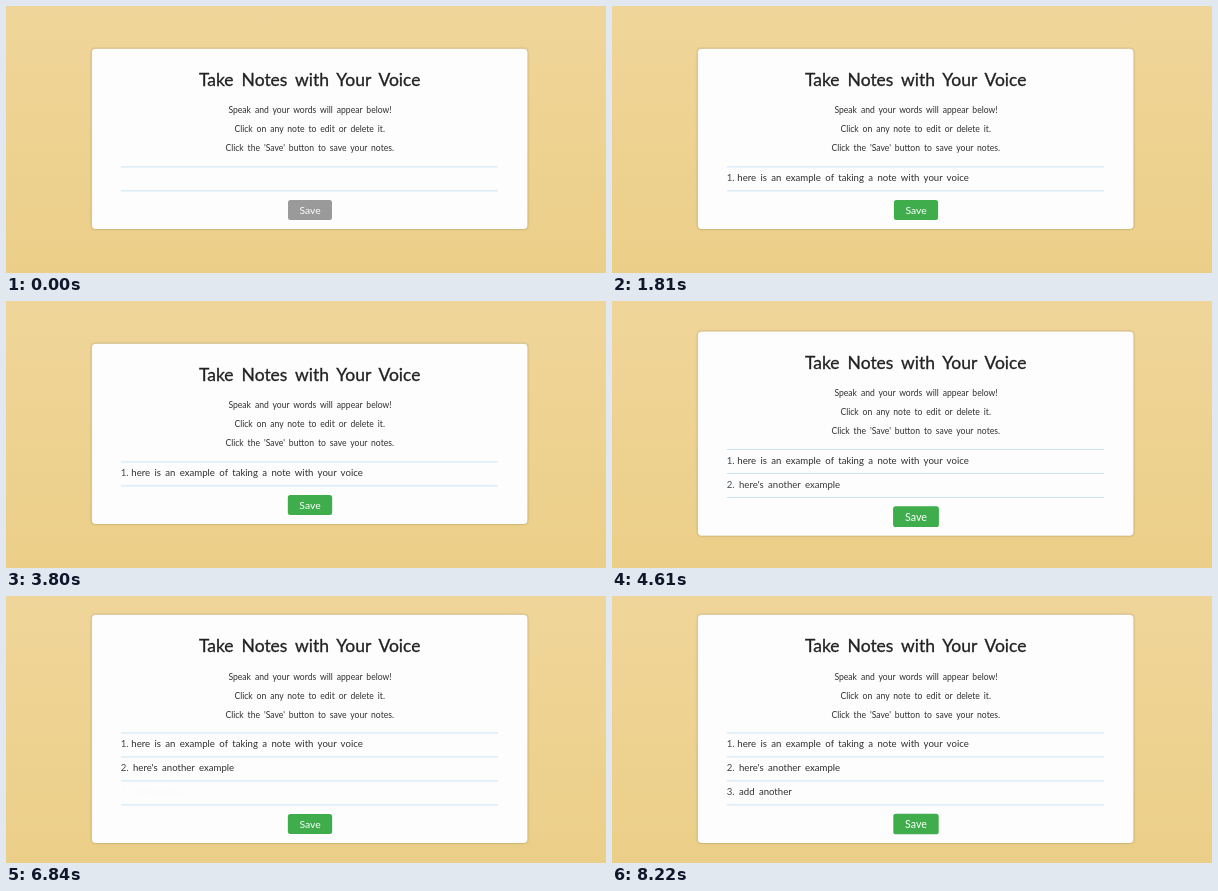
An HTML page for the animation above (8260 ms loop, 600 by 267 pixels).

```html
<!DOCTYPE html>
<html lang="en">
<head>
<meta charset="utf-8">
<title>Voice notes</title>
<style>
  html, body { margin: 0; width: 100%; height: 100%; overflow: hidden; background: #edd290; }
  svg { display: block; width: 100%; height: 100%; }
  text { font-family: Lato, "Open Sans", sans-serif; fill: #2f2f2f; word-spacing: .2em; }
  .mid { text-anchor: middle; }
  .title { font-size: 17.5px; fill: #222; stroke: #222; stroke-width: .3; stroke-linejoin: round; }
  .hint { font-size: 8.6px; }
  .note { font-size: 9.6px; }
  .num { fill: #3d4852; }
  .label { font-size: 10.3px; fill: #fff; }
  #card { fill: #fdfdfd; filter: drop-shadow(0 .6px .8px rgba(60, 45, 10, .4)); }
  .line { fill: #b3d9f0; }
</style>
</head>
<body>
<svg viewBox="0 0 600 267" preserveAspectRatio="none">
  <defs>
    <linearGradient id="sand" x1="0" y1="0" x2="0" y2="1">
      <stop offset="0" stop-color="#f0d59a"/>
      <stop offset="1" stop-color="#ebcf88"/>
    </linearGradient>
  </defs>
  <rect width="600" height="267" fill="url(#sand)"/>
  <rect id="card" x="85.8" width="435.7" rx="4"/>
  <g id="head">
    <text class="mid title" x="303.7" y="37">Take Notes with Your Voice</text>
    <text class="mid hint" x="304" y="64.7">Speak and your words will appear below!</text>
    <text class="mid hint" x="303.7" y="83.7">Click on any note to edit or delete it.</text>
    <text class="mid hint" x="303.7" y="102.7">Click the 'Save' button to save your notes.</text>
  </g>
  <g id="list"></g>
  <g id="save">
    <rect x="-22" y="-10" width="44" height="20" rx="2.5"/>
    <text class="mid label" y="3.8">Save</text>
  </g>
</svg>
<script>
const LOOP = 8260, PULSE_START = 890, PULSE = 1010;
// The page is shown scaled down; the card's offset snaps to whole page pixels.
const PX = 0.615, ROW = 39 * PX, TOP = 42.8, BASE_HEIGHT = 180.2;
const GREY = [154, 154, 154], GREEN = [63, 173, 76];
const notes = [
  { text: 'here is an example of taking a note with your voice', x: 125.3, start: 860 },
  { text: "here's another example", x: 127, start: 3990 },
  { text: 'add another', x: 127, start: 6510 }
];

const byId = id => document.getElementById(id);
const card = byId('card'), head = byId('head'), list = byId('list'), save = byId('save');
const saveBox = save.querySelector('rect');

function add(parent, tag, attrs = {}, text = '') {
  const el = document.createElementNS('http://www.w3.org/2000/svg', tag);
  for (const key in attrs) el.setAttribute(key, attrs[key]);
  el.textContent = text;
  parent.append(el);
  return el;
}

const clamp = v => Math.min(1, Math.max(0, v));
const smooth = v => { v = clamp(v); return v * v * (3 - 2 * v); };
const easeOut = v => 1 - (1 - clamp(v)) ** 3;
const snap = v => Math.round(v / PX) * PX;

const lines = [0, 1, 2, 3].map(() =>
  add(list, 'rect', { class: 'line', x: 115, width: 377, height: 0.7 }));
notes.forEach((note, i) => {
  note.el = add(list, 'g');
  add(note.el, 'text', { class: 'note num', x: 114.8 }, `${i + 1}.`);
  add(note.el, 'text', { class: 'note', x: note.x }, note.text);
});

function draw(t) {
  // The first row is already open; later ones unfold, then their text fades in.
  const open = notes.map((note, i) => i ? easeOut((t - note.start) / 250) : 1);
  const grown = ROW * (open.reduce((a, b) => a + b) - 1);
  const count = open.filter(v => v > 0).length;
  const height = BASE_HEIGHT + grown;
  const top = TOP - snap(grown / 2);

  card.setAttribute('y', top);
  card.setAttribute('height', height);
  head.setAttribute('transform', `translate(0 ${top})`);

  let y = top + 117.8;
  lines.forEach((line, i) => {
    if (i) y += ROW * open[i - 1];
    line.setAttribute('y', y);
    line.setAttribute('visibility', i <= count ? 'visible' : 'hidden');
    const note = notes[i];
    if (!note) return;
    note.el.setAttribute('transform', `translate(0 ${y + 14.5})`);
    note.el.setAttribute('opacity', smooth((t - note.start - 310) / 360));
  });

  const phase = Math.max(0, t - PULSE_START) / PULSE;
  const scale = 1 + 0.03 * (1 - Math.cos(2 * Math.PI * phase));
  const tint = smooth((t - notes[0].start) / 300);
  const colour = GREY.map((c, i) => Math.round(c + (GREEN[i] - c) * tint));
  save.setAttribute('transform', `translate(304 ${top + height - 19}) scale(${scale})`);
  saveBox.setAttribute('fill', `rgb(${colour})`);
}

const begin = performance.now();
function tick() {
  draw((performance.now() - begin) % LOOP);
  requestAnimationFrame(tick);
}
tick();
</script>
</body>
</html>
```
